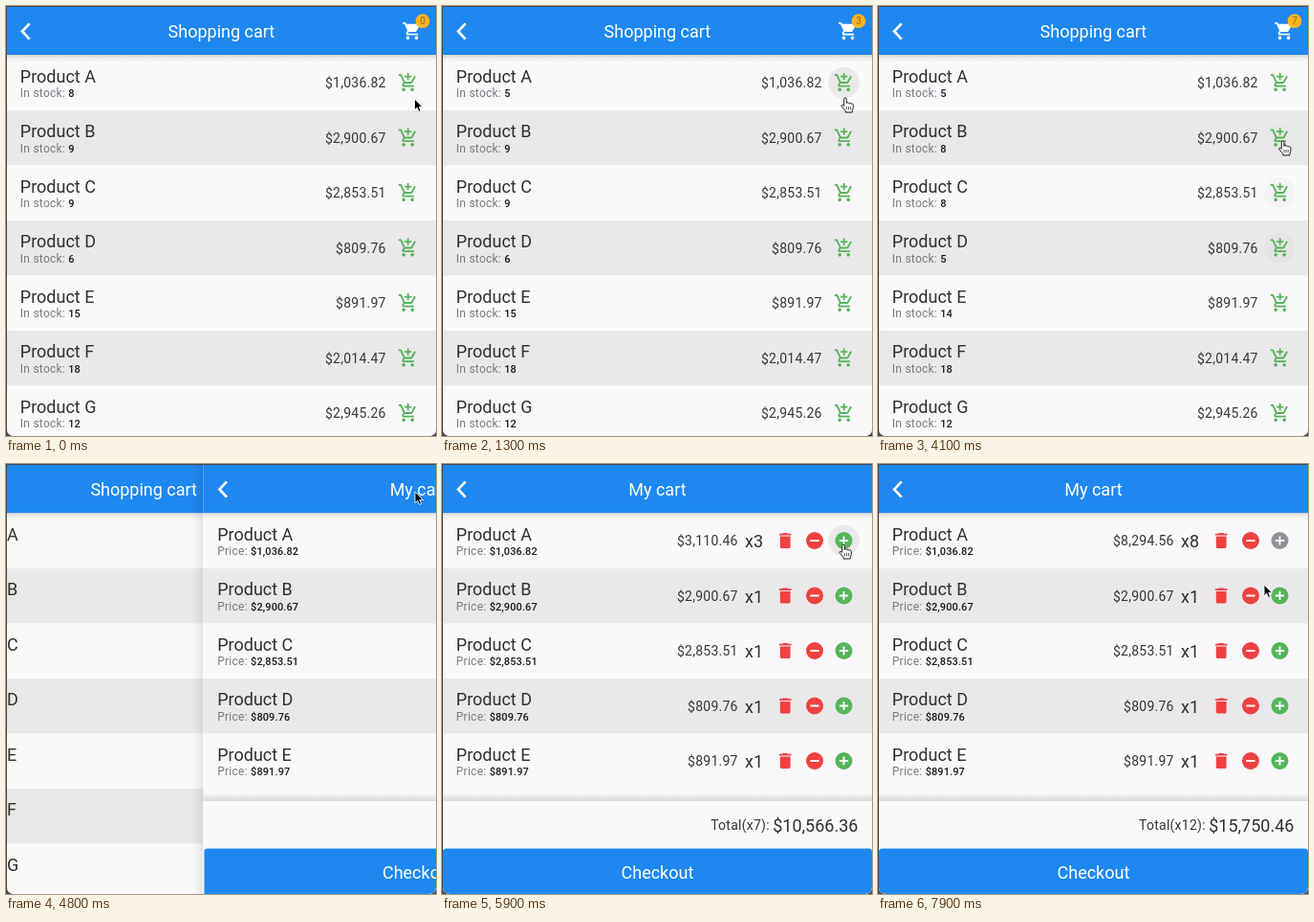
An HTML page for the animation above (8 s loop, 450 by 449 pixels).

```html
<!DOCTYPE html>
<html lang="en">
<head>
<meta charset="utf-8">
<title>Shopping cart</title>
<style>
  html, body { margin: 0; width: 100%; height: 100%; overflow: hidden; background: #4b4b4f; }
  svg { display: block; font-family: Roboto, Arial, sans-serif; }
  text { white-space: pre; }
  .title { font-size: 18px; fill: #fff; text-anchor: middle; }
  .name { font-size: 18px; fill: #303032; }
  .note { font-size: 12px; letter-spacing: .25px; fill: #7c7a7e; }
  .bold { font-size: 11px; font-weight: 500; letter-spacing: .1px; fill: #1b1b1b; }
  .price { font-size: 14px; letter-spacing: .25px; fill: #363638; text-anchor: end; }
  .count { font-size: 18px; fill: #303032; }
  .sum { font-size: 18px; fill: #303032; text-anchor: end; }
  .badge { font-size: 10px; fill: #a05f14; text-anchor: middle; }
</style>
</head>
<body>
<svg id="stage" width="450" height="449" viewBox="0 0 450 449">
  <defs>
    <clipPath id="window"><path d="M1 1H450V441q0 8-8 8H9q-8 0-8-8Z"/></clipPath>
    <linearGradient id="down" x2="0" y2="1">
      <stop offset="0" stop-opacity=".16"/><stop offset=".4" stop-opacity=".05"/><stop offset="1" stop-opacity="0"/>
    </linearGradient>
    <linearGradient id="up" y1="1" x2="0" y2="0">
      <stop offset="0" stop-opacity=".13"/><stop offset="1" stop-opacity="0"/>
    </linearGradient>
    <linearGradient id="side" x1="1" x2="0">
      <stop offset="0" stop-opacity=".08"/><stop offset="1" stop-opacity="0"/>
    </linearGradient>
    <path id="cart" d="M7 18c-1.1 0-1.99.9-1.99 2S5.9 22 7 22s2-.9 2-2-.9-2-2-2zM1 2v2h2l3.6 7.59-1.35 2.45c-.16.28-.25.61-.25.96 0 1.1.9 2 2 2h12v-2H7.42c-.14 0-.25-.11-.25-.25l.03-.12.9-1.63h7.45c.75 0 1.41-.41 1.75-1.03l3.58-6.49c.08-.14.12-.31.12-.48 0-.55-.45-1-1-1H5.21l-.94-2H1zm16 16c-1.1 0-1.99.9-1.99 2s.89 2 1.99 2 2-.9 2-2-.9-2-2-2z"/>
    <path id="add" d="M11 9h2V6h3V4h-3V1h-2v3H8v2h3v3zm-4 9c-1.1 0-1.99.9-1.99 2S5.9 22 7 22s2-.9 2-2-.9-2-2-2zm10 0c-1.1 0-1.99.9-1.99 2s.89 2 1.99 2 2-.9 2-2-.9-2-2-2zm-9.83-3.25l.03-.12.9-1.63h7.45c.75 0 1.41-.41 1.75-1.03l3.86-7.01L19.42 4h-.01l-1.1 2-2.76 5H8.53l-.13-.27L6.16 6l-.95-2-.94-2H1v2h2l3.6 7.59-1.35 2.45c-.16.28-.25.61-.25.96 0 1.1.9 2 2 2h12v-2H7.42c-.13 0-.25-.11-.25-.25z"/>
    <path id="bin" d="M6 19c0 1.1.9 2 2 2h8c1.1 0 2-.9 2-2V7H6v12zM19 4h-3.5l-1-1h-5l-1 1H5v2h14V4z"/>
  </defs>
  <g clip-path="url(#window)">
    <g id="shop"></g>
    <g id="basket"></g>
  </g>
  <path id="arrow" d="M0 0V11.6L2.7 9.2 4.6 13.4 6.6 12.5 4.8 8.4H8.4Z" fill="#000" stroke="#fff" stroke-width=".9"/>
  <g id="hand" stroke="#111" stroke-width=".95" stroke-linejoin="round">
    <path fill="#fff" d="M-1.3 8V1.3a1.3 1.3 0 0 1 2.6 0V5.4c.3-.9 2.2-.8 2.5.3 .4-.7 2-.6 2.3.5 .6-.6 2.2-.2 2.2 1V10.4c0 1.3-.8 2-1 3V15H.2V13.5C-.8 12-2.4 10.6-3.8 8.7-4.4 7.4-2.9 6.6-1.3 8.4Z"/>
    <path fill="none" stroke-width=".7" d="M1.4 9v3.2M3.5 9v3.2M5.6 9v3.2"/>
  </g>
</svg>
<script>
const LOOP = 8000, PITCH = 57.5, TOP = 51.5;
const BLUE = '#1e88f0', RED = '#ee4242', GREEN = '#55b55a', GRAY = '#929094';
const LIGHT = '#faf8fb', DARK = '#eae8ea';
const PUSH_AT = 4695, PUSH_TIME = 500;

// name, price, stock, times of clicks in the shop
const products = [
  ['A', 1036.82, 8, [500, 800, 1100]],
  ['B', 2900.67, 9, [1950]],
  ['C', 2853.51, 9, [2450]],
  ['D', 809.76, 6, [3050]],
  ['E', 891.97, 15, [3550]],
  ['F', 2014.47, 18, []],
  ['G', 2945.26, 12, []]
];
const plusClicks = [6080, 6330, 6580, 6830, 7080];
const START_TOTAL = 10566.36;

// time, x, y of the pointer tip
const track = [
  [0, 427.5, 97], [300, 423, 95], [1300, 422, 96], [1500, 422, 96],
  [1800, 423, 142], [2050, 423, 142], [2300, 424, 198], [2520, 424, 198],
  [2800, 425, 253], [3120, 425, 253], [3400, 420, 310], [3760, 420, 310],
  [4360, 426, 29], [4600, 428, 29], [5150, 428, 29], [5750, 420, 84],
  [7250, 420, 84], [7850, 404, 126], [8000, 404, 126]
];

const $ = id => document.getElementById(id);
const money = v => '$' + v.toLocaleString('en-US', { minimumFractionDigits: 2, maximumFractionDigits: 2 });
const passed = (times, t) => times.filter(c => c <= t).length;

function el(parent, tag, attrs, text) {
  const node = document.createElementNS('http://www.w3.org/2000/svg', tag);
  for (const key in attrs) node.setAttribute(key, attrs[key]);
  if (text !== undefined) node.textContent = text;
  return parent.appendChild(node);
}
const rect = (p, x, y, width, height, fill, more) => el(p, 'rect', { x, y, width, height, fill, ...more });
const label = (p, cls, x, y, text) => el(p, 'text', { class: cls, x, y }, text);
const icon = (p, id, cx, cy, fill, scale = .9) =>
  el(p, 'use', { href: '#' + id, fill, transform: `translate(${cx - 12 * scale} ${cy - 12 * scale}) scale(${scale})` });

function roundButton(p, cx, cy, fill, isPlus) {
  const disc = el(p, 'circle', { cx, cy, r: 9, fill });
  const d = `M${cx - 4.6} ${cy}h9.2` + (isPlus ? `M${cx} ${cy - 4.6}v9.2` : '');
  el(p, 'path', { d, stroke: '#fff', 'stroke-width': 1.8 });
  return disc;
}

function header(p, title) {
  rect(p, 0, 51, 451, 8, 'url(#down)');
  rect(p, 0, 0, 451, 51, BLUE);
  el(p, 'path', { d: 'M24.6 18.3 17 26.4 24.6 34.6', fill: 'none', stroke: '#fff', 'stroke-width': 2.7 });
  label(p, 'title', 225.4, 33, title);
}

function row(p, i, note) {
  const y = TOP + i * PITCH;
  rect(p, 0, y, 451, PITCH, i % 2 ? DARK : LIGHT);
  const glow = el(p, 'circle', { cx: 420.5, cy: y + 28.5, r: 16.3, opacity: 0 });
  label(p, 'name', 14.8, y + 28, 'Product ' + products[i][0]);
  const line = label(p, 'note', 14.8, y + 43.5, note);
  const bold = el(line, 'tspan', { class: 'bold' });
  return { y: y + 28.5, glow, bold };
}

const shop = $('shop'), basket = $('basket');

rect(shop, 0, 0, 451, 449, LIGHT);
const shopRows = products.map(([, price], i) => {
  const r = row(shop, i, 'In stock: ');
  label(shop, 'price', 397.7, r.y + 5, money(price));
  icon(shop, 'add', 420.7, r.y, GREEN);
  return r;
});
header(shop, 'Shopping cart');
icon(shop, 'cart', 425, 26, '#fff');
el(shop, 'circle', { cx: 436, cy: 15.7, r: 7.4, fill: '#f9b520' });
const badge = label(shop, 'badge', 436, 19.3, '');

rect(basket, -12, 0, 12, 449, 'url(#side)');
rect(basket, 0, 0, 451, 449, LIGHT);
const basketRows = products.slice(0, 5).map(([, price], i) => {
  const r = row(basket, i, 'Price: ');
  r.bold.textContent = money(price);
  r.price = label(basket, 'price', 309.7, r.y + 5, money(price));
  r.count = label(basket, 'count', 317, r.y + 7, 'x1');
  icon(basket, 'bin', 359.2, r.y, RED);
  roundButton(basket, 390, r.y, RED);
  r.plus = roundButton(basket, 420.5, r.y, GREEN, true);
  return r;
});
header(basket, 'My cart');
rect(basket, 0, 343, 451, 9, 'url(#up)');
rect(basket, 0, 352, 451, 97, LIGHT);
const totalLabel = label(basket, 'price', 342.8, 382, '');
const total = label(basket, 'sum', 435.4, 383.5, '');
rect(basket, 1, 401.5, 449, 50, BLUE, { rx: 3.5 });
label(basket, 'title', 225.4, 433, 'Checkout');

function bezier(x1, y1, x2, y2) {
  const at = (a, b, u) => 3 * (1 - u) * (1 - u) * u * a + 3 * (1 - u) * u * u * b + u * u * u;
  return x => {
    if (x <= 0 || x >= 1) return x <= 0 ? 0 : 1;
    let lo = 0, hi = 1;
    for (let i = 0; i < 24; i++) {
      const mid = (lo + hi) / 2;
      if (at(x1, x2, mid) < x) lo = mid; else hi = mid;
    }
    return at(y1, y2, lo);
  };
}
const slide = bezier(.35, .91, .33, .97);

function pointer(t) {
  const i = Math.max(1, track.findIndex(k => k[0] >= t));
  const [t0, x0, y0] = track[i - 1], [t1, x1, y1] = track[i];
  const u = Math.max(0, (t - t0) / (t1 - t0)), e = u * u * (3 - 2 * u);
  return [x0 + (x1 - x0) * e, y0 + (y1 - y0) * e];
}

function hovers(t, y) {
  const [px, py] = pointer(t);
  return Math.hypot(px - 420.5, py - y) < 17;
}

// share of the last 200 ms spent over the button
function glowAt(t, y) {
  let n = 0;
  for (let k = 0; k < 10; k++) n += hovers(Math.max(0, t - k * 20), y);
  return .065 * n / 10;
}

function draw(t) {
  const push = slide((t - PUSH_AT) / PUSH_TIME);
  shop.setAttribute('transform', `translate(${-150 * push} 0)`);
  basket.setAttribute('transform', `translate(${450 * (1 - push)} 0)`);
  shop.style.display = push < 1 ? '' : 'none';
  basket.style.display = push > 0 ? '' : 'none';

  let items = 0;
  shopRows.forEach((r, i) => {
    const taken = passed(products[i][3], t);
    items += taken;
    r.bold.textContent = products[i][2] - taken;
    r.glow.setAttribute('opacity', push ? 0 : glowAt(t, r.y));
  });
  badge.textContent = items;

  const extra = passed(plusClicks, t), full = extra === plusClicks.length;
  const price = products[0][1], first = basketRows[0];
  first.price.textContent = money(price * (3 + extra));
  first.count.textContent = 'x' + (3 + extra);
  first.plus.setAttribute('fill', full ? GRAY : GREEN);
  totalLabel.textContent = `Total(x${7 + extra}):`;
  total.textContent = money(START_TOTAL + extra * price);
  basketRows.forEach((r, i) =>
    r.glow.setAttribute('opacity', push < 1 || (i === 0 && full) ? 0 : glowAt(t, r.y)));

  const [x, y] = pointer(t);
  const onCart = !push && x > 410 && y < 46;
  const onButton = shopRows.some((r, i) => hovers(t, r.y) && !(full && i === 0));
  const isHand = onCart || onButton;
  for (const id of ['hand', 'arrow']) {
    $(id).setAttribute('transform', `translate(${x} ${y})`);
    $(id).style.display = (id === 'hand') === isHand ? '' : 'none';
  }
}

const begin = performance.now();
function tick() {
  draw((performance.now() - begin) % LOOP);
  requestAnimationFrame(tick);
}
tick();
</script>
</body>
</html>
```
